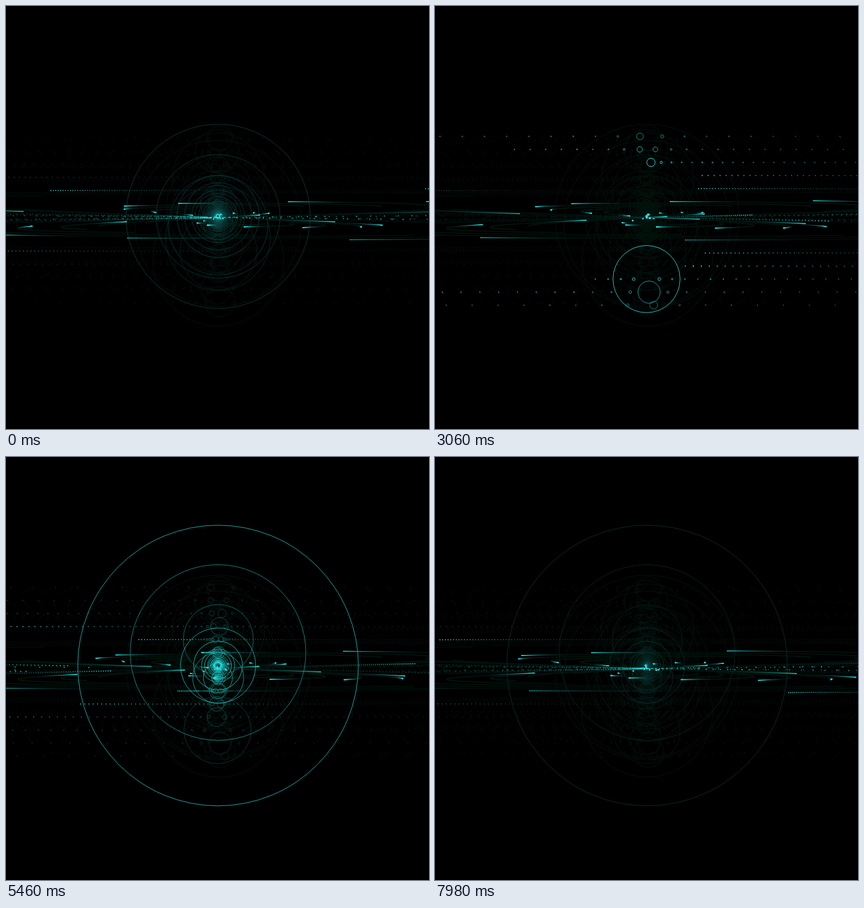
Animation, 748 px wide and 748 px high, one loop 8 s. Source, as an HTML page with a canvas:

```html
<!DOCTYPE html>
<html lang="en">
<head>
<meta charset="utf-8">
<title>Orbit trails</title>
<style>
  html, body { margin: 0; width: 100%; height: 100%; overflow: hidden; background: #000; }
  canvas { display: block; width: 748px; height: 748px; }
</style>
</head>
<body>
<canvas id="stage" width="748" height="748"></canvas>
<script>
const SIZE = 748, CX = 375, CY = 374, LOOP = 8000;
const SCALE = 1.0472;      // pixels per unit
const COUNT = 150;         // particles
const TURN = 0.002;        // phase per step, in radians
const PHASE = -0.7588;
const FIRST_STEP = -380;   // where the oldest trails begin
const FADE = 33;           // steps until a trail has faded to 1/e

const ctx = document.getElementById('stage').getContext('2d');

// Key points of the pace: [time in ms, picture count]
const PACE = [[0, 0], [860, 8], [2120, 19], [3780, 35], [4780, 45], [6140, 58], [7980, 74], [8000, 74.5]];

// Each particle runs along a figure eight; its ring swells as it crosses the middle.
function particle(j, step) {
  const angle = 2 * j + TURN * step + PHASE;
  const sin = Math.sin(angle), cos = Math.cos(angle);
  return {
    x: CX - SCALE * j * j * sin * cos,
    y: CY + SCALE * j * cos,
    r: SCALE / 2 / Math.abs(j * sin)
  };
}

// Trails never fade out entirely but leave a dark green trace.
function shade(age) {
  const a = Math.exp(-age / FADE);
  return `rgb(${34 * a | 0},${Math.max(18, 240 * a) | 0},${Math.max(10, 238 * a) | 0})`;
}

function drawStep(step, age) {
  ctx.fillStyle = ctx.strokeStyle = shade(age);
  for (let j = 1; j <= COUNT; j++) {
    const { x, y, r } = particle(j, step);
    if (x + r < -2 || x - r > SIZE + 2) continue;
    if (r < .6) {
      const side = 1 + 2 * Math.max(.3, r);
      ctx.fillRect(x - side / 2, y - side / 2, side, side);
    } else {
      ctx.beginPath();
      ctx.arc(x, y, r, 0, 2 * Math.PI);
      ctx.stroke();
    }
  }
}

function draw(now) {
  ctx.globalCompositeOperation = 'source-over';
  ctx.fillStyle = '#000';
  ctx.fillRect(0, 0, SIZE, SIZE);
  ctx.globalCompositeOperation = 'lighten';
  for (let step = FIRST_STEP; step <= now; step++) drawStep(step, now - step);
}

function pictureAt(t) {
  const k = PACE.findIndex(p => p[0] > t);
  const [t0, n0] = PACE[k - 1], [t1, n1] = PACE[k];
  return Math.floor(n0 + (n1 - n0) * (t - t0) / (t1 - t0) + 1e-6);
}

let shown = -1;
const begin = performance.now();
function tick() {
  const picture = pictureAt((performance.now() - begin) % LOOP);
  if (picture !== shown) {
    shown = picture;
    draw(2 * picture);
  }
  requestAnimationFrame(tick);
}
tick();
</script>
</body>
</html>
```
